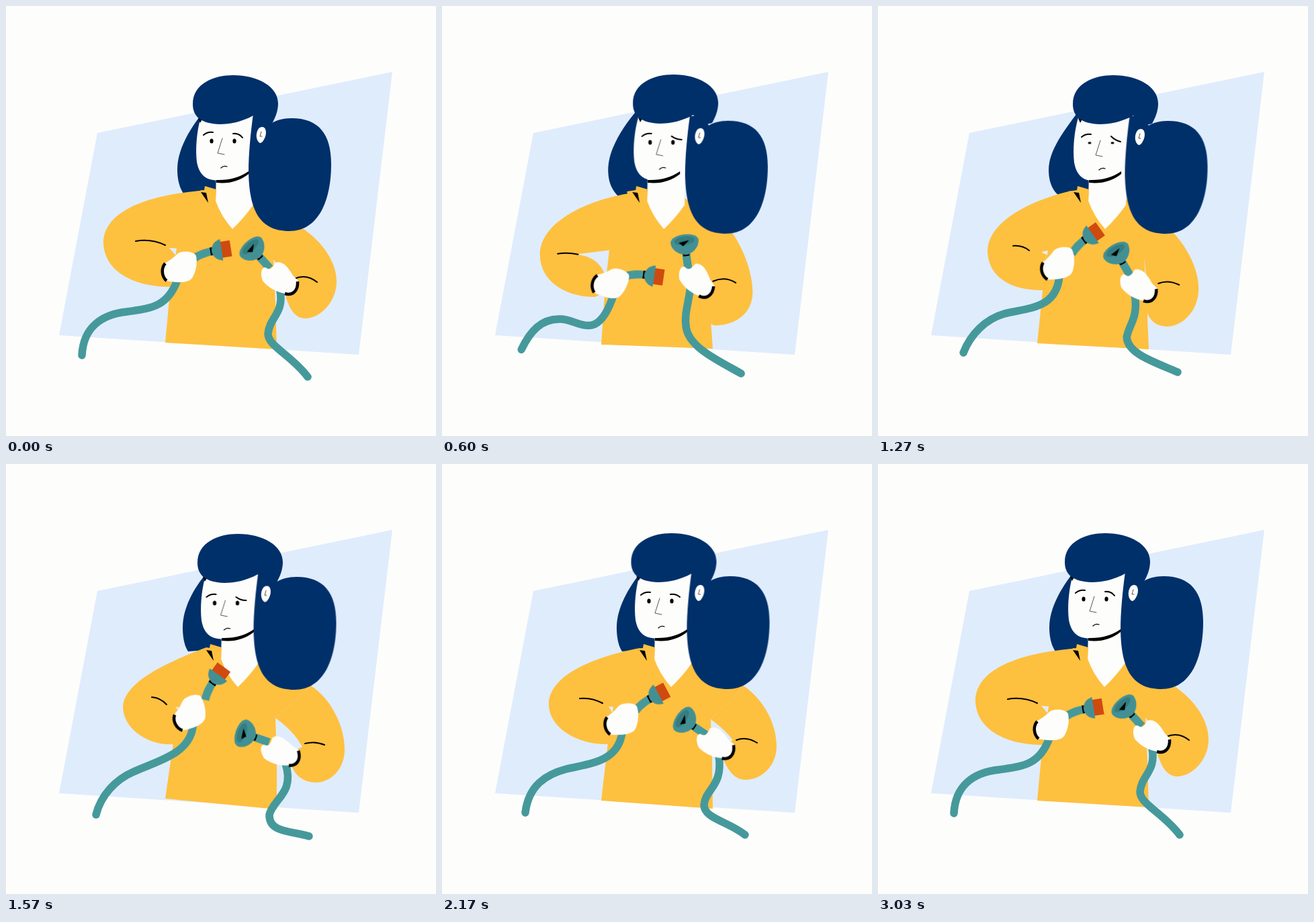
Animation, 640 px wide and 640 px high, one loop 3.06 s. Source, as an HTML page without scripts:

```html
<!DOCTYPE html>
<html lang="en">
<head>
<meta charset="utf-8">
<title>Unplugged</title>
<style>
html, body { margin: 0; width: 100%; height: 100%; overflow: hidden; background: #fdfdfc; }
svg { display: block; width: 100vw; height: 100vh; }
.skin { fill: #fdfdfc; }
.hair { fill: #00306a; }
.shirt { fill: #fec03f; }
.line { fill: none; stroke: #000; stroke-width: 2; stroke-linecap: round; }
.thin { stroke: #555; stroke-width: 1; }
.cuff { stroke-width: 4.5; stroke-linecap: butt; }
.cable { fill: none; stroke: #46999a; stroke-width: 11.5; stroke-linecap: round; }
.stub { stroke-width: 12; stroke-linecap: butt; }

/* Three moves with rests between: down until 22%, up until 51%, home until 83%. */
.move { animation: 3060ms ease-out infinite; }

/* head and chest */
#chest { animation-name: chest; }
@keyframes chest {
  0%, 83%, 100% { transform: none; animation-timing-function: ease-in; }
  10.78% { transform: translate(-3.5px, 0); }
  22%, 33% { transform: translate(-7px, 0); animation-timing-function: ease-in; }
  41.5% { transform: translate(1px, 0); }
  51.31%, 58.5% { transform: translate(8px, 0); animation-timing-function: ease-in; }
  70.92% { transform: translate(4px, 0); }
}
#face { animation-name: face; }
@keyframes face {
  0%, 83%, 100% { transform: none; animation-timing-function: ease-in; }
  10.78% { transform: translate(-1px, 0); }
  22%, 33% { transform: translate(2.5px, 0); animation-timing-function: ease-in-out; }
  41.5% { transform: translate(8px, 1px); }
  51.31%, 58.5% { transform: translate(7px, 1px); animation-timing-function: ease-in; }
  70.92% { transform: translate(4px, 0); }
}
#cap { animation-name: cap; }
@keyframes cap {
  0%, 83%, 100% { transform: none; animation-timing-function: ease-in; }
  10.78% { transform: translate(1px, -1px); }
  22%, 33% { transform: translate(6.5px, -1px); animation-timing-function: ease-in-out; }
  41.5% { transform: translate(12px, 0); animation-timing-function: ease-in-out; }
  51.31%, 58.5% { transform: translate(7px, 1px); animation-timing-function: ease-in; }
  70.92% { transform: translate(3.5px, 0); }
}
#lobe { animation-name: lobe; }
@keyframes lobe {
  0%, 83%, 100% { transform: none; animation-timing-function: ease-in; }
  10.78% { transform: translate(-1px, 1px); }
  22%, 33% { transform: translate(1px, 4px); animation-timing-function: ease-in; }
  41.5% { transform: translate(6.5px, 4px); }
  51.31%, 58.5% { transform: translate(7.5px, 1px); animation-timing-function: ease-in; }
  70.92% { transform: translate(3.5px, 0); }
}
#ear { animation-name: ear; }
@keyframes ear {
  0%, 10.78%, 83%, 100% { transform: none; animation-timing-function: ease-in-out; }
  22%, 33% { transform: translate(4px, 2px); animation-timing-function: ease-in-out; }
  41.5% { transform: translate(10px, 3px); animation-timing-function: ease-in-out; }
  51.31%, 58.5% { transform: translate(7px, 1.5px); animation-timing-function: ease-in; }
  70.92% { transform: translate(3.5px, 0); }
}
#look { animation-name: look; }
@keyframes look {
  0%, 83%, 100% { transform: none; animation-timing-function: ease-in; }
  10.78% { transform: translate(0, 1px); }
  22%, 33% { transform: translate(4px, 2px); animation-timing-function: ease-in-out; }
  41.5% { transform: translate(9px, 3px); animation-timing-function: ease-in-out; }
  51.31%, 58.5% { transform: translate(4.5px, 6px); animation-timing-function: ease-in; }
  70.92% { transform: translate(2px, 3px); }
}
#brow { animation-name: brow; }
@keyframes brow {
  0%, 10.78%, 83%, 100% { d: path("M338 190 Q347 189 352 196"); }
  22%, 33%, 51.31%, 58.5% { d: path("M338 192 Q344 197 353 197"); }
  41.5% { d: path("M338 191 Q344 197 352 199"); }
  70.92% { d: path("M338 191 Q346 190 352 195"); }
}
.eye { transform-box: fill-box; transform-origin: center; animation-name: blink; }
@keyframes blink {
  0%, 7.5%, 14.2%, 38.3%, 44.8%, 100% { transform: none; }
  10.78%, 41.5% { transform: scaleY(.4); }
}
#back { animation-name: back; }
@keyframes back {
  0%, 83%, 100% { d: path("M292 160 C272 185 255 215 255 243 C255 262 260 273 264 279 L313 275 L315 200Z"); animation-timing-function: ease-in; }
  10.78% { d: path("M292 160 C269 185 251 215 251 244 C251 264 257 274 262 281 L310 276 L315 200Z"); }
  22%, 33% { d: path("M294 150 C268 180 247 214 247 244 C247 265 255 276 262 283 L306 277 L318 200Z"); animation-timing-function: ease-in; }
  41.5% { d: path("M299 156 C278 184 254 215 254 244 C254 264 261 275 268 281 L314 275 L322 200Z"); }
  51.31%, 58.5% { d: path("M299 162 C279 185 263 215 263 243 C263 262 267 273 271 279 L321 275 L322 200Z"); animation-timing-function: ease-in; }
  70.92% { d: path("M296 161 C277 185 260 215 260 243 C260 262 264 273 268 279 L317 275 L319 200Z"); }
}

/* shirt */
#torso { animation-name: torso; }
@keyframes torso {
  0%, 83%, 100% { d: path("M290 274 L365 285 L442 332 L398 376 L401 440 L403 511 L237 501 L245 415 L255 355Z"); animation-timing-function: ease-in; }
  10.78% { d: path("M287 276 L362 285 L436 334 L396 376 L398 440 L403 509 L237 503 L243 415 L250 355Z"); }
  22%, 33% { d: path("M283 278 L360 285 L430 335 L396 376 L398 440 L403 510 L237 504 L243 415 L250 355Z"); animation-timing-function: ease-in; }
  41.5% { d: path("M290 275 L366 285 L438 336 L396 376 L400 440 L403 511 L237 502 L246 415 L254 355Z"); }
  51.31%, 58.5% { d: path("M298 273 L373 285 L454 330 L401 378 L403 440 L403 514 L237 498 L249 415 L258 355Z"); animation-timing-function: ease-in; }
  70.92% { d: path("M294 274 L369 285 L450 331 L400 380 L402 440 L403 513 L237 501 L247 415 L256 355Z"); }
}
#armL { animation-name: armL; }
@keyframes armL {
  0%, 83%, 100% { d: path("M290 275 C225 280 145 300 145 353 C147 398 195 418 244 418 L262 405 L256 375 Q250 368 243 360 L260 361Z"); animation-timing-function: ease-in-out; }
  10.78% { d: path("M288 277 C222 284 143 312 143 362 C143 404 185 432 228 431 L250 420 L243 398 Q236 368 203 364 L260 361Z"); }
  22%, 33% { d: path("M284 278 C216 288 146 322 146 371 C146 410 185 434 229 433 L250 420 L243 402 Q234 374 200 370 L260 362Z"); animation-timing-function: ease-in; }
  41.5% { d: path("M288 275 C230 288 163 320 163 365 C164 405 200 424 247 423 L262 405 L254 372 Q250 370 243 366 L260 362Z"); }
  51.31%, 58.5% { d: path("M298 273 C252 291 175 321 174 362 C175 395 213 420 250 417 L270 395 L262 372 Q258 368 252 362 L270 360Z"); animation-timing-function: ease-in; }
  70.92% { d: path("M294 274 C232 286 159 312 159 358 C160 395 205 418 247 417 L262 403 L256 374 Q252 368 248 361 L262 362Z"); }
}
#armR { animation-name: armR; }
@keyframes armR {
  0%, 83%, 100% { d: path("M440 330 C470 350 492 380 492 410 C492 440 468 465 445 465 C430 465 421 450 415 428 L400 415 L420 405 Q408 390 396 375Z"); animation-timing-function: ease-in; }
  10.78% { d: path("M434 332 C462 362 481 392 481 417 C481 448 457 469 433 469 C418 469 408 462 401 452 L390 425 L405 408 Q400 391 396 375Z"); }
  22%, 33% { d: path("M430 335 C450 365 461 400 461 427 C461 458 435 476 405 476 C395 476 385 455 380 430 L370 415 L390 405 Q393 390 396 375Z"); animation-timing-function: ease-in; }
  41.5% { d: path("M438 336 C463 362 477 395 477 420 C477 455 452 477 430 477 C414 477 400 468 396 440 L385 425 L400 412 Q398 393 396 375Z"); }
  51.31%, 58.5% { d: path("M454 330 C484 350 504 390 504 425 C504 455 482 474 462 474 C441 474 429 462 424 446 L410 435 L441 421 Q428 397 401 378Z"); animation-timing-function: ease-in; }
  70.92% { d: path("M450 331 C480 352 498 388 498 420 C498 450 475 470 452 470 C435 470 425 455 418 438 L405 425 L433 411 Q420 394 400 380Z"); }
}
#foldL { animation-name: foldL; }
@keyframes foldL {
  0%, 83%, 100% { d: path("M193 350 Q216 346 237 356"); animation-timing-function: ease-in-out; }
  10.78% { d: path("M174 364 Q192 361 210 365"); }
  22%, 33% { d: path("M172 369 Q187 367 202 370"); animation-timing-function: ease-in; }
  41.5% { d: path("M201 357 Q215 356 225 364"); }
  51.31%, 58.5% { d: path("M217 347 Q230 348 239 358"); animation-timing-function: ease-in; }
  70.92% { d: path("M205 349 Q222 347 239 356"); }
}
#foldR { animation-name: foldR; }
@keyframes foldR {
  0%, 83%, 100% { d: path("M429 406 Q447 398 463 411"); animation-timing-function: ease-in; }
  10.78% { d: path("M421 406 Q437 400 453 411"); }
  22%, 33% { d: path("M402 410 Q420 402 436 412"); animation-timing-function: ease-in; }
  41.5% { d: path("M417 413 Q432 407 448 415"); }
  51.31%, 58.5% { d: path("M445 416 Q460 412 474 418"); animation-timing-function: ease-in; }
  70.92% { d: path("M438 411 Q453 405 469 415"); }
}

/* cables, plugs and hands */
#cableL { animation-name: cableL; }
@keyframes cableL {
  0%, 83%, 100% { d: path("M113 520 C115 478 143 459 180 455 C214 450 240 449 255 408"); animation-timing-function: ease-in-out; }
  10.78% { d: path("M120 517 C130 487 152 466 178 466 C204 467 232 504 256 428"); }
  22%, 33% { d: path("M118 511 C131 484 148 464 178 466 C206 468 232 502 256 428"); animation-timing-function: ease-in; }
  41.5% { d: path("M127 516 C138 488 160 466 188 458 C222 449 267 452 270 400"); }
  51.31%, 58.5% { d: path("M134 522 C141 494 162 470 190 458 C225 442 272 432 278 392"); animation-timing-function: ease-in; }
  70.92% { d: path("M124 519 C129 478 155 462 185 454 C218 446 262 444 268 400"); }
}
#cableR { animation-name: cableR; }
@keyframes cableR {
  0%, 83%, 100% { d: path("M408 424 C414 458 392 463 390 488 C390 506 425 520 449 552"); animation-timing-function: ease-in; }
  10.78% { d: path("M392 422 C393 455 380 465 380 486 C382 508 415 518 447 547"); }
  22%, 33% { d: path("M368 420 C364 445 359 460 362 477 C366 508 410 528 445 547"); animation-timing-function: ease-in; }
  41.5% { d: path("M382 430 C387 465 374 472 370 493 C372 518 412 530 446 545"); }
  51.31%, 58.5% { d: path("M416 446 C430 490 398 498 392 522 C391 549 425 546 451 554"); animation-timing-function: ease-in; }
  70.92% { d: path("M412 434 C419 480 391 484 390 508 C391 528 426 532 451 552"); }
}
#plug { animation-name: plug; }
@keyframes plug {
  0%, 83%, 100% { transform: translate(307px, 365px) rotate(-9deg); animation-timing-function: ease-in-out; }
  10.78% { transform: translate(303px, 401px) rotate(13deg); }
  22%, 33% { transform: translate(302px, 400px) rotate(8deg); animation-timing-function: ease-in; }
  41.5% { transform: translate(308px, 348px) rotate(-35deg); }
  51.31%, 58.5% { transform: translate(308px, 325px) rotate(-54deg); animation-timing-function: ease-in; }
  70.92% { transform: translate(310px, 349px) rotate(-28deg); }
}
#handL { animation-name: handL; }
@keyframes handL {
  0%, 83%, 100% { transform: translate(235px, 396px); animation-timing-function: ease-in-out; }
  10.78% { transform: translate(226px, 411px) rotate(14deg); }
  22%, 33% { transform: translate(226px, 413px) rotate(15deg); animation-timing-function: ease-in; }
  41.5% { transform: translate(246px, 395px) rotate(-10deg); }
  51.31%, 58.5% { transform: translate(254px, 386px) rotate(-22deg); animation-timing-function: ease-in; }
  70.92% { transform: translate(245px, 390px) rotate(-6deg); }
}
#socket { animation-name: socket; }
@keyframes socket {
  0%, 83%, 100% { transform: translate(378px, 374px) rotate(-42deg); animation-timing-function: ease-in; }
  10.78% { transform: translate(372px, 373px) rotate(-28deg); }
  22%, 33% { transform: translate(363px, 370px) rotate(-6deg); animation-timing-function: ease-in; }
  41.5% { transform: translate(364px, 382px) rotate(-30deg); }
  51.31%, 58.5% { transform: translate(371px, 407px) rotate(-71deg); animation-timing-function: ease-in; }
  70.92% { transform: translate(375px, 391px) rotate(-56deg); }
}
#handR { animation-name: handR; }
@keyframes handR {
  0%, 83%, 100% { transform: translate(427px, 421px); animation-timing-function: ease-in; }
  10.78% { transform: translate(415px, 424px) rotate(2deg); }
  22%, 33% { transform: translate(394px, 427px) rotate(11deg); animation-timing-function: ease-in; }
  41.5% { transform: translate(407px, 432px) rotate(1deg); }
  51.31%, 58.5% { transform: translate(431px, 439px) rotate(-14deg); animation-timing-function: ease-in; }
  70.92% { transform: translate(428px, 430px) rotate(-5deg); }
}
</style>
</head>
<body>
<svg viewBox="0 0 640 640">
  <path fill="#dfecfc" d="M136 189 L575 98 L525 519 L79 490Z"/>
  <path id="back" class="move hair"/>
  <path id="torso" class="move shirt"/>
  <path id="armL" class="move shirt"/>
  <path id="armR" class="move shirt"/>
  <path id="foldL" class="move line"/>
  <path id="foldR" class="move line"/>

  <path id="face" class="move skin" d="M290 165 C283 190 282 215 284 232 C288 254 300 260 318 259.500 C338 258.500 352 253 362 245 L372 160Z"/>
  <g id="chest" class="move">
    <path class="skin" d="M313 245 L312 290 Q320 313 337 332 Q354 316 368 296 L368 240Z"/>
    <path class="shirt" d="M282 276 L295 274 L296 268 L313 273 L312 292 L285 290Z"/>
    <path d="M290 277 L298 278 L301 293Z"/>
    <path d="M313 259 Q341 260 361 246 L361 250 Q341 266 313 263Z"/>
  </g>
  <path id="lobe" class="move hair" d="M368 160 C364 190 361 220 361 247 C362 300 375 335 422 335 C465 335 484 290 484 235 C484 190 465 167 425 167 C412 167 403 170 396 174 L390 160Z"/>
  <g id="cap" class="move">
    <path d="M286 167 L293 167 L289 174Z"/>
    <path class="hair" d="M278 146 C278 115 310 103 338 103 C375 103 405 120 405 145 C405 156 401 166 396 175 L376 180 L368 163 C352 172 334 176 318 176 C292 175 278 166 278 146Z"/>
  </g>
  <g id="ear" class="move">
    <path class="skin" d="M381 180 C387 180 388 188 386 194 C384 200 381 204 378 204 C374 202 372 196 373 190 C374 184 377 180 381 180Z"/>
    <path class="line thin" d="M380 187 L378 194 L381 194"/>
  </g>
  <g id="look" class="move">
    <ellipse class="move eye" cx="306" cy="201" rx="2.600" ry="3.500"/>
    <ellipse class="move eye" cx="340" cy="201" rx="2.600" ry="3.500"/>
    <path class="line" d="M294 192 Q300 187 308 188"/>
    <path id="brow" class="move line"/>
    <path class="line thin" d="M322 197 L315 219 L325 221"/>
    <path class="line" style="stroke-width:1.300" d="M320 241 Q324 237 329 239"/>
  </g>

  <path id="cableL" class="move cable"/>
  <path id="cableR" class="move cable"/>

  <g id="plug" class="move">
    <path class="cable stub" d="M-28 6 Q-14 0 1 0"/>
    <path fill="#cf4a10" d="M12 -12 H28 V12 H12Z"/>
    <path d="M-3 -6 H1 V6 H-3Z"/>
    <path fill="#439094" d="M14 -16 C3 -14 -1 -6 -1 0 C-1 6 3 14 14 16Z"/>
  </g>
  <g id="handL" class="move">
    <path class="skin" d="M1 -13 C8 -17 14 -21 20 -27 C26 -33 46 -31 48 -24 C50 -14 48 0 42 9 C36 17 18 16 4 13 C0 5 -1 -5 1 -13Z"/>
    <path class="line cuff" d="M2 -13 C-4 -6 -4 6 4 13"/>
  </g>

  <g id="socket" class="move">
    <path class="cable stub" d="M0 0 V22"/>
    <path d="M-6 -2 H6 L4 2 H-4Z"/>
    <path fill="#429094" d="M-21 -20 C-20 -34 20 -34 21 -20 C20 -8 9 0 0 0 C-10 -1 -21 -9 -21 -20Z"/>
    <ellipse fill="#357d80" cy="-21" rx="15" ry="6.500"/>
    <path d="M-9 -19 L7 -21 L-3 -13Z"/>
  </g>
  <g id="handR" class="move">
    <path class="skin" d="M-11 7 C-25 5 -38 -3 -45 -12 C-49 -22 -47 -32 -41 -32 C-35 -28 -32 -28 -26 -39 C-16 -42 -8 -34 0 -20 L8 -12 C8 0 0 8 -11 7Z"/>
    <path class="line cuff" d="M-12 7 C0 11 8 2 7 -11"/>
  </g>
</svg>
</body>
</html>
```
